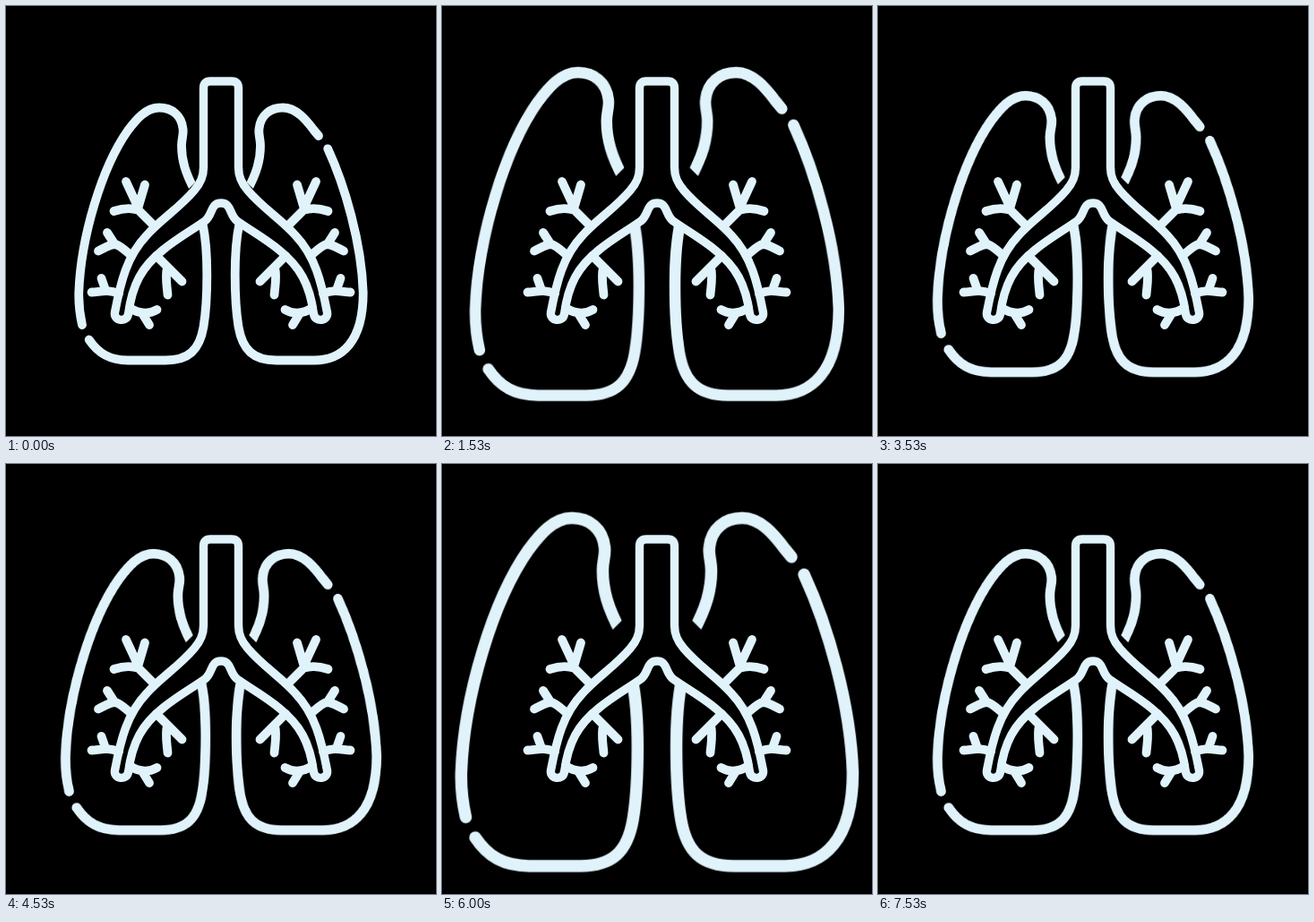
An HTML page for the animation above (7990 ms loop, 480 by 480 pixels).

```html
<!DOCTYPE html>
<html lang="en">
<head>
<meta charset="utf-8">
<title>Breathing lungs</title>
<style>
  html, body { margin: 0; width: 100%; height: 100%; overflow: hidden; background: #000; }
  svg { display: block; width: 100vw; height: 100vh; }
  path { fill: none; stroke: #e0f3fb; stroke-width: 9.8; stroke-linecap: round; stroke-linejoin: round; }
  .tube { fill: #000; stroke-width: 9.4; }
  .cut { stroke: #000; stroke-width: 14; stroke-linecap: butt; }
  .lungs {
    transform-origin: 240px 254.7px;
    animation: breathe 7990ms step-end infinite;
  }
  /* Two breaths, each rising and falling in four hard steps */
  @keyframes breathe {
    0%, 50.063%, 100% { transform: scale(1); }
    6.633%, 44.18%, 56.696%, 94.243% { transform: scale(1.094); }
    12.516%, 37.547%, 62.578%, 87.61% { transform: scale(1.181); }
    19.149%, 31.665%, 69.212%, 80.976% { transform: scale(1.278); }
    25.031%, 75.094% { transform: scale(1.377); }
  }
</style>
</head>
<body>
<svg viewBox="0 0 480 480">
  <defs>
    <g id="twigs">
      <path d="M134 196L147.5 225L155 199.500M120.500 229C131 225.500 141 225.500 148 228L164 244"/>
      <path d="M113 253L121 265.500C127 267 131 271 138 277M103 273.500C109 271 115 266 122 266"/>
      <path d="M106.500 304L111 317M95.500 319.500C106 319 113 316 126 321"/>
      <path d="M196.500 307.500L168 279M180.500 322.500C179.500 311 177.500 302 180 292"/>
      <path d="M168.500 339C160 344 149 344 138 337M160 356L152 343"/>
    </g>
    <!-- Trims the inner end of a lung along a slant -->
    <path id="cut" class="cut" d="M201 217L225 193"/>
  </defs>

  <g class="lungs">
    <g>
      <path d="M211 206.500C200 186 196 172 196 156C196 148 198.500 143 197.500 137C196 122 185 113.500 171 113.500C156 113.500 145 127 136 139C107 180 83.500 258 81.300 320C81 333 82.500 345 85 356"/>
      <path d="M219.500 243C223 259 224.300 280 224.300 300C224.300 323 223.500 340 220.500 358C216 384 204 395.500 178 395.500H136C116 395.500 103 388 92.700 372.500"/>
      <use href="#cut"/>
    </g>
    <g transform="matrix(-1 0 0 1 480 0)">
      <path d="M211 206.500C200 186 196 172 196 156C196 148 198.500 143 197.500 137C196 122 185 113.500 171 113.500C156 113.500 145 127 136 139L131 145"/>
      <path d="M219.500 243C223 259 224.300 280 224.300 300C224.300 323 223.500 340 220.500 358C216 384 204 395.500 178 395.500H136C105 395.500 81.300 375 81.300 320C83 264 102 200 120.800 159.300"/>
      <use href="#cut"/>
    </g>
  </g>

  <g>
    <path class="tube" d="M240 84H228Q220.500 84 220.500 92V180C220.500 191 217 198 210 206C194 225 172 239 157 256C135 279 128 308 121.500 342C120 352 135 353.500 136.500 344C141 310 152 291 175 272.500C190 260 208 250 222 240C231 233 228 220 240 220C252 220 249 233 258 240C272 250 290 260 305 272.500C328 291 339 310 343.500 344C345 353.500 360 352 358.500 342C352 308 345 279 323 256C308 239 286 225 270 206C263 198 259.500 191 259.500 180V92Q259.500 84 252 84Z"/>
    <use href="#twigs"/>
    <use href="#twigs" transform="matrix(-1 0 0 1 480 0)"/>
  </g>
</svg>
</body>
</html>
```
